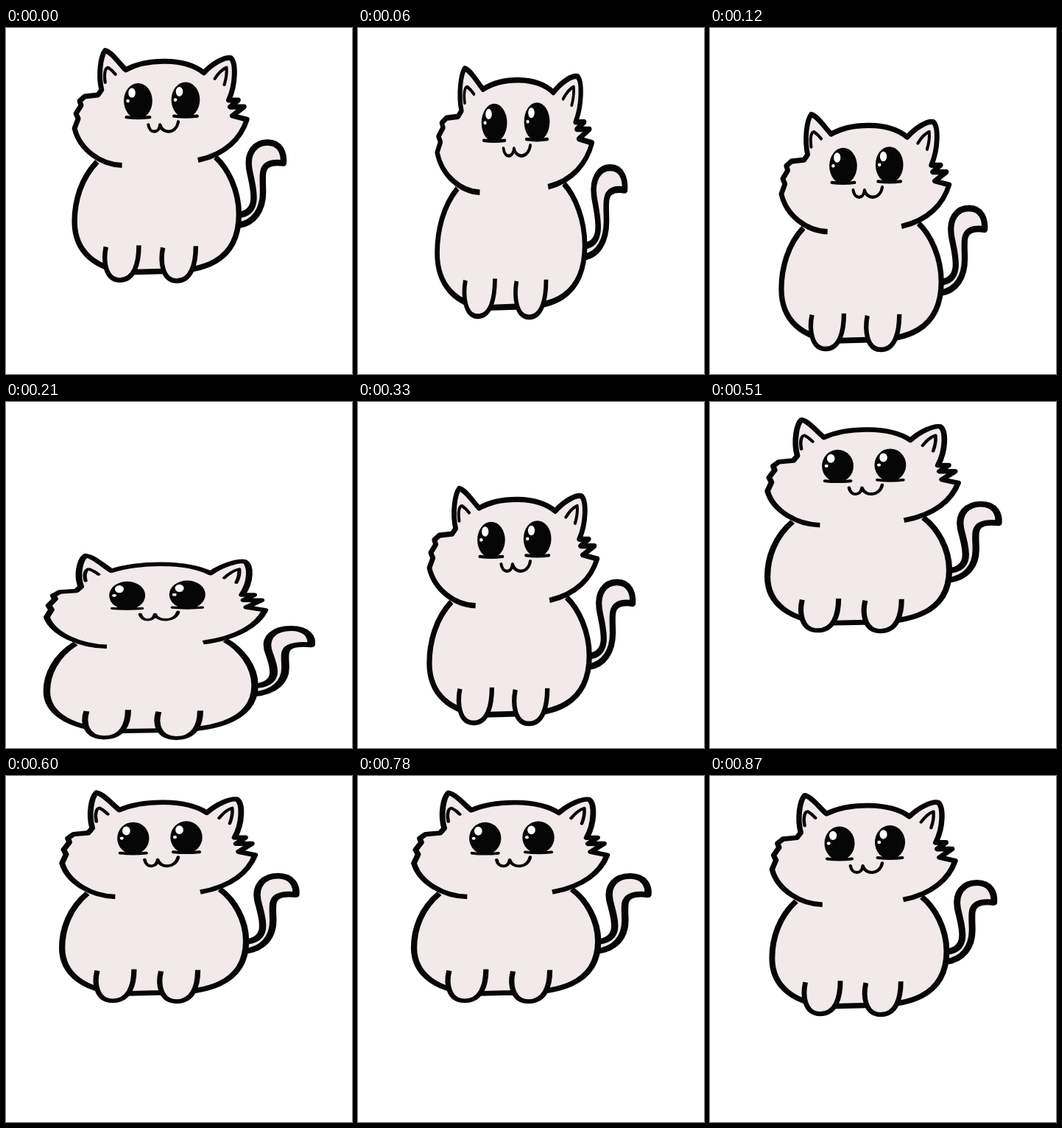
Animation of 470x470 px, one loop 900 ms. Source, as an HTML page:

```html
<!DOCTYPE html>
<html lang="en">
<head>
<meta charset="utf-8">
<title>Bouncing cat</title>
<style>
  html, body { margin: 0; height: 100%; overflow: hidden; background: #fff; }
  svg { display: block; width: 100vw; height: 100vh; }
  #cat { fill: #f1e9ea; stroke: #060606; stroke-width: 7.5; stroke-linejoin: round; }
  #paw { stroke-width: 6.5; }
  #head { stroke-width: 7; }
  .line { fill: none; stroke-width: 4.2; stroke-linecap: round; }
  .iris { fill: #060606; stroke: none; }
  .shine { fill: #fff; stroke: none; }
</style>
</head>
<body>
<svg viewBox="0 0 470 470">
  <g id="cat">
    <path id="tail" stroke-width="8.5" d="M316 267C338 264 350 246 350 222C350 204 347 190 357 185Q364 181 378 183C379 170 374 155 356 155S328 170 331 190S350 250 316 253"/>
    <path id="body" d="M123 181C101 203 92 234 92 262C92 300 118 329 175 330L212 329C265 330 317 318 317 252C317 220 302 190 285 175"/>
    <path id="paw" d="M135 296C131 315 134 341 154 341S180 318 180 294"/>
    <use href="#paw" x="78" y="1"/>
    <path id="head" d="M157 186C128 185 99 165 92 136L97 123L94 116L101 105L99 99L106 93L124 91L129 84C124 63 128 38 134 31C143 33 152 47 162 57C190 42 243 40 269 61C281 48 298 39 306 41C313 47 313 76 303 98L316 98L305 107L324 107L308 119L328 124C320 149 299 171 261 179"/>
    <path class="line" d="M134 74C132 62 134 54 138 54Q143 57 148 63M284 69Q292 57 300 54Q301 65 297 77"/>
    <path class="line" d="M193 131C195 144 208 143 209 131C212 144 231 144 234 127"/>
    <g id="eye">
      <ellipse class="iris" cx="179" cy="99" rx="19.500" ry="24"/>
      <path class="line" stroke-linecap="round" d="M163 121Q179 123 195 121"/>
      <ellipse class="shine" cx="170.500" cy="88" rx="4.800" ry="6.500"/>
      <circle class="shine" cx="165" cy="99" r="2.300"/>
    </g>
    <use href="#eye" x="65" y="-1.500"/>
  </g>
</svg>
<script>
  const cat = document.getElementById("cat");
  const LOOP = 900, STEP = 30, APEX = 22.5;
  const REST = { width: 294, height: 318, x: 235, y: 186 };

  const clamp = u => Math.min(1, Math.max(0, u));
  const cosEase = u => (1 - Math.cos(Math.PI * clamp(u))) / 2;
  const sigmoid = u => 1 / (1 + Math.exp(-u));

  function draw(now) {
    const step = Math.floor((now % LOOP) / STEP);
    const gap = Math.abs(step - APEX);
    const fall = Math.min(gap, LOOP / STEP - gap);

    // The feet drop first and the ears follow; width makes up for height.
    const bottom = 309 + 150 * cosEase((fall - 4.43) / 9.2);
    const top = 18.7 + 210 * sigmoid(0.76 * (fall - 11.76));
    const height = bottom - top;
    const width = REST.width - 1.17 * (height - REST.height);

    cat.setAttribute("transform",
      `translate(${REST.x} ${(top + bottom) / 2}) ` +
      `scale(${width / REST.width} ${height / REST.height}) ` +
      `translate(${-REST.x} ${-REST.y})`);
  }

  const start = performance.now();
  function tick() {
    draw(performance.now() - start);
    requestAnimationFrame(tick);
  }
  tick();
</script>
</body>
</html>
```
